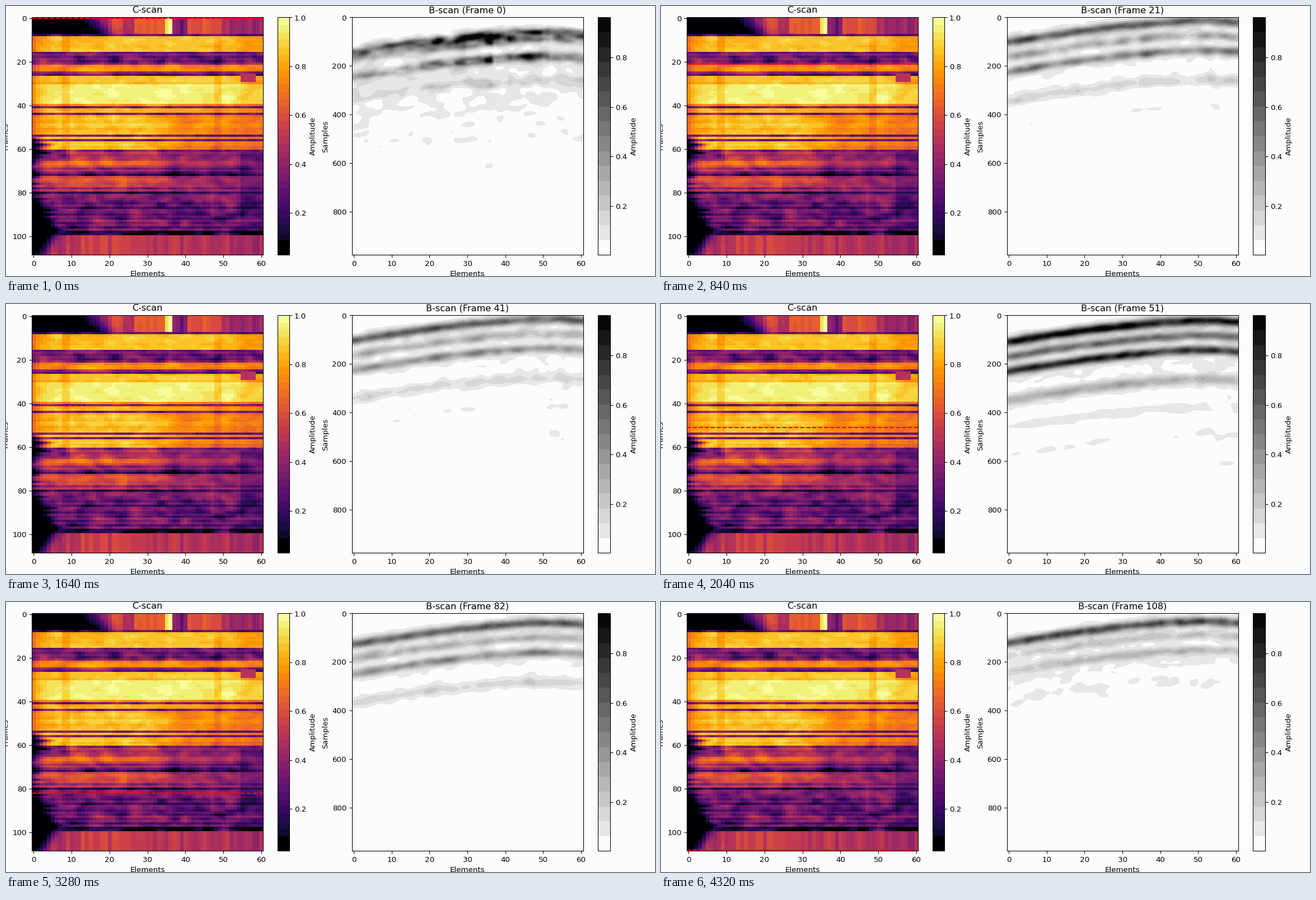
A matplotlib script that plays this animation: 1159x483 px, repeating every 4360 ms.

```python
import numpy as np
import matplotlib.pyplot as plt
from matplotlib.animation import FuncAnimation
from matplotlib.colors import ListedColormap

W, H, DPI = 1159, 483, 96.6
FRAMES, COLS, DEPTH = 109, 61, 978
PAPER = "#fcfcfc"
rng = np.random.default_rng(7)
row, col = np.arange(FRAMES), np.arange(COLS)


def sigmoid(v):
    return 1 / (1 + np.exp(-np.clip(v, -40, 40)))


def bump(v, mid, width):
    return np.exp(-((v - mid) / width) ** 2)


def steps(pairs, v):
    """Piecewise constant function given as (start, level) pairs."""
    start, level = np.array(pairs).T
    return level[np.searchsorted(start, v, side="right") - 1]


def smooth(a, axis, width):
    k = bump(np.arange(-3 * width, 3 * width + 1), 0, 1.4 * width)
    return np.apply_along_axis(np.convolve, axis, a, k / k.sum(), "same")


def noise(shape, tall, wide):
    a = smooth(smooth(rng.normal(size=shape), -2, tall), -1, wide)
    return a / a.std()


# ---- C-scan: horizontal bands, thin dark rows, column shading ----
BANDS = [(0, .6), (9, .86), (16, .42), (22, .76), (25, .46), (27, .87),
         (31, .96), (40, .76), (42, .86), (62, .52), (66, .66), (69, .48),
         (73, .6), (78, .43), (82, .38), (87, .28), (93, .33), (100, .53)]
THIN = [8, 41, 44, 54, 56, 61, 72, 80, 98]
TOP = [(0, .45), (20, .62), (24, .48), (27, .66), (35, .95), (37, .34),
       (41, .6), (50, .44)]


def make_cscan():
    level = steps(BANDS, row)
    mid = (row >= 9) & (row < 100)
    level = level + mid * (1 - level) * rng.normal(0, .12, FRAMES)
    level[THIN] *= .45

    shade = 1 - .2 * np.exp(-col / 2) - .1 * bump(col, 8.5, 1) - .1 * bump(col, 48.5, 1)
    shade = shade - .08 * sigmoid(col - 54)
    fade = np.interp(row, [39, 45, 57, 66, 80, 82], [0, .14, .14, .3, .26, .1])
    fade = fade[:, None] * sigmoid((col - 34) / 2)
    grain = noise((FRAMES, COLS), 1, 1)
    c = level[:, None] * shade * (1 - fade)
    c += (.01 + .08 * (1 - level))[:, None] * grain
    c[26:30, 55:59] = .5
    c[62:100, 55:] *= .8

    stripes = rng.normal(0, .035, COLS)
    c[:8] = steps(TOP, col) + stripes
    c[100:] = .45 + .12 * bump(col, 22, 14) + .04 * bump(col, 47, 6) + stripes

    # black left margin
    edge = 7 * bump(row, 96, 14) + 4 * bump(row, 61, 5) - 3
    edge = edge + rng.normal(0, 1.2, FRAMES) * mid
    edge = np.where(row < 8, 15 + .6 * row, np.where(row < 55, -20, edge + 2))
    c *= sigmoid((col - edge[:, None]) / np.where(row < 9, 1.6, .9)[:, None])
    return np.clip(c, .027, 1)


cscan = make_cscan()

# ---- B-scan: curved echoes whose strength follows the C-scan row ----
# spacing of echoes 2-4 below the first one, then their gains
EARLY = (28, 97, 192), (.6, 1, .25)
MAIN = (61, 121, 240), (.62, .95, .32)
LATE = (57, 117, 240), (.32, .38, .04)

KNOTS = 15
y = np.arange(1, DEPTH, 2.0)[:, None]
layer = noise((KNOTS, 720, COLS), 4, 1)
shaft = noise((KNOTS, len(y), COLS), 7, 1)


def blend(stack, t):
    i = min(int(t), KNOTS - 2)
    k = t - i
    return ((1 - k) * stack[i] + k * stack[i + 1]) / np.hypot(k, 1 - k)


def bscan(f):
    early, late = f < 9, f >= 100
    (s2, s3, s4), (g2, g3, g4) = EARLY if early else LATE if late else MAIN
    top = 67 if early else np.interp(f, [9, 30, 80, 108], [26, 11, 43, 36])
    arc = (80 if early else 88) * (np.clip(50 - col, 0, None) / 50) ** 1.5
    rel = y - top - arc - .06 * np.clip(col - 50, 0, None) ** 2

    # noise drifts slowly and rests in the first and last block
    t = np.interp(f, [0, 8, 9, 99, 100, 108], [0, .1, 1, 12.5, 13.6, 13.7])
    n = blend(layer, t)[np.clip((rel + 200) / 2, 0, 719).astype(int), col]
    v = blend(shaft, t)

    def echo(pos, amp, sigma=13):
        return amp * np.exp(-.5 * ((rel - pos) / sigma) ** 2)

    amp = np.maximum(cscan[f], .3)
    power = bright = cscan[f].mean()
    z = echo(0, np.maximum(amp, .42) ** .75)
    z += echo(s2, g2 * amp) + echo(s3, g3 * amp)
    for k in range(4):
        z += echo(s4 + 113 * k, g4 * amp * .32 ** min(k, 1) * .8 ** k, 16)
    z *= 1 + (.2 if early else .05) * n

    inside = sigmoid((rel + 42) / 5)
    deep = np.clip(rel, 0, None)
    halo = .1 if early else .05 + .06 * bright
    reach = 380 if early else 200 + 160 * power
    ripple = .8 + .2 * np.cos(2 * np.pi * (rel - 140) / 115)
    z += halo * inside * ripple * np.exp(-(deep / reach) ** (6 if late else 2))
    mix = .7 * n + .7 * v if early else .9 * n + .3 * v
    z += (.035 if early else .025) * inside * mix * np.exp(-deep / 450)

    # streaky reverberation below the right-hand elements
    side = bump(f, 38, 26) * bump(col, 54, 4.5)
    z += side * inside * (.012 + .03 * v) * sigmoid((650 - y) / 80)
    return np.clip(z, 0, .96)


# ---- figure ----
grey_map = ListedColormap([PAPER] + [str(g / 255) for g in range(231, 0, -16)])
fire = plt.get_cmap("inferno")((np.arange(32) + .5) / 32)
fire[:2] = (0, 0, 4 / 255, 1)
fire_map = ListedColormap(fire)

# the tiny surplus keeps rounding from losing a pixel
fig = plt.figure(figsize=((W + 1e-6) / DPI, (H + 1e-6) / DPI), dpi=DPI,
                 facecolor=PAPER)


def panel(x0, x1):
    return fig.add_axes([x0 / W, 1 - 445.5 / H, (x1 - x0) / W, 425 / H],
                        facecolor=PAPER)


ax_c, bar_c = panel(46, 459.2), panel(484.5, 505.5)
ax_b, bar_b = panel(617.5, 1030.5), panel(1057, 1078.5)

im_c = ax_c.imshow(cscan, cmap=fire_map, vmin=.027, vmax=1, aspect="auto",
                   interpolation="nearest")
im_b = ax_b.imshow(bscan(0), cmap=grey_map, vmin=.0008, vmax=.963,
                   aspect="auto", interpolation="bilinear",
                   extent=(-.5, 60.5, DEPTH, 0))
cursor = ax_c.axhline(0, color="red", linestyle="--")

ax_c.set(title="C-scan", xlabel="Elements", ylabel="Frames")
ax_b.set(xlabel="Elements", ylabel="Samples")
title = ax_b.set_title("B-scan (Frame 0)")
for im, bar in ((im_c, bar_c), (im_b, bar_b)):
    fig.colorbar(im, cax=bar, label="Amplitude")
    bar.set_yticks([.2, .4, .6, .8] + ([1.0] if im is im_c else []))


def update(f):
    im_b.set_data(bscan(f))
    cursor.set_ydata([f, f])
    title.set_text(f"B-scan (Frame {f})")
    return im_b, cursor, title


anim = FuncAnimation(fig, update, frames=FRAMES, interval=40,
                     init_func=lambda: update(0), repeat=True, repeat_delay=0)
plt.show()
```
